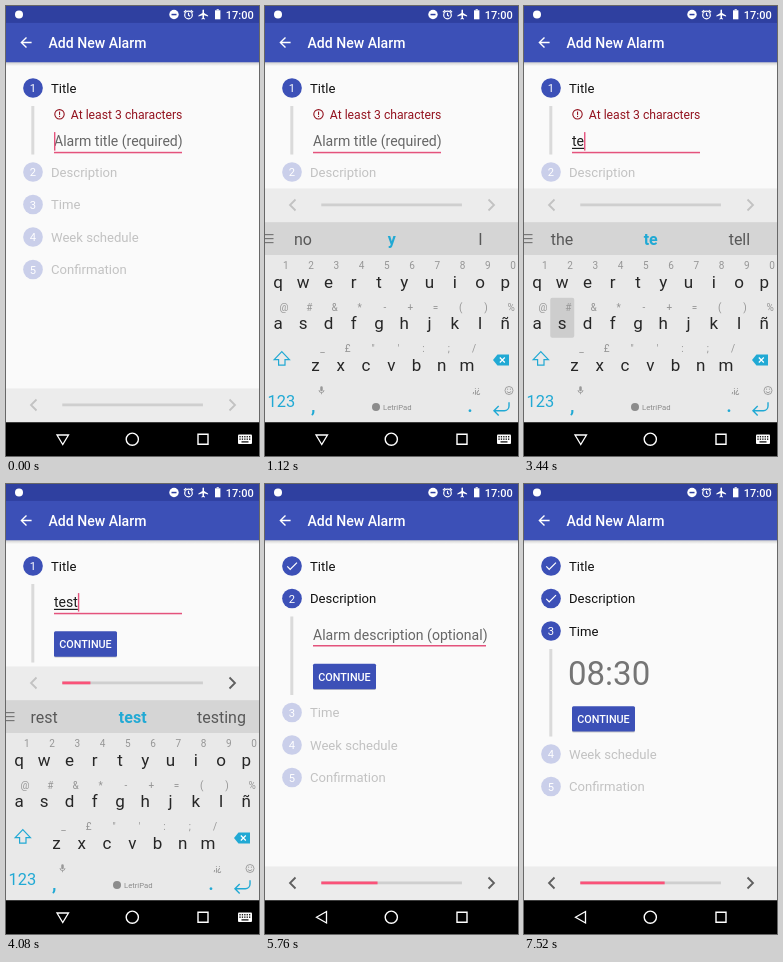
These frames come from a looping animation (253x450 px, 8000 ms). An HTML page with a canvas:

```html
<!DOCTYPE html>
<html lang="en">
<head>
<meta charset="utf-8">
<title>Add New Alarm</title>
<style>
html, body { margin: 0; width: 100%; height: 100%; overflow: hidden; background: #fafafa; }
canvas { display: block; width: 253px; height: 450px; }
</style>
</head>
<body>
<canvas id="stage"></canvas>
<script>
const W = 253, H = 450, LOOP = 8000, NAV = 416.25, BAR = 33.75;
const INDIGO = '#3c50b7', DARK = '#2f40a0', PINK = '#e4527c', CYAN = '#21a9d4', RED = '#941420';
const canvas = document.getElementById('stage');
const g = canvas.getContext('2d');
const dpr = window.devicePixelRatio || 1;
canvas.width = W * dpr;
canvas.height = H * dpr;

const ICONS = {
  back: 'M20 11H7.83l5.59-5.59L12 4l-8 8 8 8 1.41-1.41L7.83 13H20v-2z',
  plane: 'M21 16v-2l-8-5V3.5c0-.83-.67-1.5-1.5-1.5S10 2.67 10 3.5V9l-8 5v2l8-2.5V19l-2 1.5V22l3.5-1 3.5 1v-1.5L13 19v-5.5l8 2.5z',
  check: 'M9 16.17L4.83 12l-1.42 1.41L9 19 21 7l-1.41-1.41z',
  shift: 'M12 3L2.5 13H8v7h8v-7h5.5z',
  mic: 'M12 14a3 3 0 0 0 3-3V5a3 3 0 0 0-6 0v6a3 3 0 0 0 3 3zm5-3a5 5 0 0 1-10 0H5a7 7 0 0 0 6 6.9V21h2v-3.1A7 7 0 0 0 19 11z',
  enter: 'M20 4v4a5 5 0 0 1-5 5H4M9 8l-5 5 5 5',
};

// Animation helpers
const ramp = (t, a, b) => Math.min(1, Math.max(0, (t - a) / (b - a)));
const ease = (t, a, b) => (1 - Math.cos(Math.PI * ramp(t, a, b))) / 2;
const within = (t, a, b) => t >= a && t < b;

// Drawing helpers
function rect(x, y, w, h, color) {
  g.fillStyle = color;
  g.fillRect(x, y, w, h);
}
function round(x, y, w, h, r, color) {
  g.fillStyle = color;
  g.beginPath();
  g.roundRect(x, y, w, h, r);
  g.fill();
}
function disc(x, y, r, color) {
  g.fillStyle = color;
  g.beginPath();
  g.arc(x, y, r, 0, 7);
  g.fill();
}
function stroke(path, color, width = 1) {
  g.strokeStyle = color;
  g.lineWidth = width;
  g.stroke(new Path2D(path));
}
function ring(x, y, r, color, width = 1) {
  g.strokeStyle = color;
  g.lineWidth = width;
  g.beginPath();
  g.arc(x, y, r, 0, 7);
  g.stroke();
}
function text(s, x, y, size, color, align = 'left', weight = 400) {
  g.font = `${weight} ${size}px Roboto, sans-serif`;
  g.textAlign = align;
  g.fillStyle = color;
  g.fillText(s, x, y);
}
// 24-unit icon centred on x, y
function icon(name, x, y, scale, color, width = 0) {
  g.save();
  g.translate(x, y);
  g.scale(scale, scale);
  g.translate(-12, -12);
  if (width) stroke(ICONS[name], color, width / scale);
  else { g.fillStyle = color; g.fill(new Path2D(ICONS[name])); }
  g.restore();
}
function clip(x, y, w, h) {
  g.save();
  g.beginPath();
  g.rect(x, y, w, Math.max(0, h));
  g.clip();
}

function header() {
  const shade = g.createLinearGradient(0, 56, 0, 60);
  shade.addColorStop(0, 'rgba(0,0,0,.18)');
  shade.addColorStop(1, 'rgba(0,0,0,0)');
  rect(0, 56, W, 4, shade);
  rect(0, 0, W, 56.25, INDIGO);
  rect(0, 0, W, 16.9, DARK);
  disc(13, 8.5, 4, '#fff');
  disc(168, 8.5, 4.7, '#fff');
  rect(165.5, 7.8, 5, 1.5, DARK);
  ring(182.5, 9, 3.8, '#fff', 1.2);
  stroke('M182.5 6.8V9.2L184 10.2M177.9 6.2L180.2 4.2M187.1 6.2L184.8 4.2', '#fff', 1.2);
  icon('plane', 197.5, 8.5, .51, '#fff');
  rect(209, 4.3, 5.4, 9, '#fff');
  rect(210.6, 3.2, 2.2, 1.2, '#fff');
  text('17:00', 219.8, 12.8, 11, '#fff', 'left', 500);
  icon('back', 20, 36.5, .7, '#fff');
  text('Add New Alarm', 42.5, 41.9, 14.06, '#fff', 'left', 500);
}

function field(y, hint, value, width, cursor) {
  const base = y - 6.2;
  if (value) {
    text(value, 48, base, 14.06, '#1c1c1c');
    rect(48, base + 1.5, g.measureText(value).width, 1.2, '#1c1c1c');
  } else text(hint, 48, base, 14.06, '#666');
  rect(48, y - .7, width, 1.5, PINK);
  if (cursor) {
    g.font = '14.06px Roboto, sans-serif';
    rect(48 + g.measureText(value).width, y - 20.4, 1.4, 18.5, PINK);
  }
}

function button(y, pressed) {
  round(48, y + .8, 63, 25.4, 1.5, 'rgba(0,0,0,.2)');
  round(48, y, 63, 25.4, 1.5, pressed ? DARK : INDIGO);
  text('CONTINUE', 79.5, y + 16.7, 10.8, '#fff', 'center', 500);
}

function titleBody(y, t, typed) {
  const valid = ease(t, 3560, 4060), line = y + 64.5 - 17 * valid;
  if (valid < 1) {
    g.globalAlpha = 1 - valid;
    ring(53.5, y + 26.3, 4.7, RED, 1.1);
    rect(53, y + 23.6, 1.1, 3.3, RED);
    rect(53, y + 27.9, 1.1, 1.1, RED);
    text('At least 3 characters', 64.8, y + 30.8, 12.2, RED);
    g.globalAlpha = 1;
  }
  field(line, 'Alarm title (required)', typed, 128, t < 1120 || within(t, 2080, 4960));
  button(line + 17.8, within(t, 4880, 5300));
}
function descriptionBody(y, t) {
  field(y + 47.2, 'Alarm description (optional)', '', 173, within(t, 5200, 5760));
  button(y + 65.3, within(t, 7040, 7360));
}
function timeBody(y) {
  text('08:30', 44, y + 53.8, 33, '#757575');
  button(y + 75.2, false);
}

function steps(t, active, typed) {
  const first = (51.5 + 30 * ease(t, 3560, 4060)) * (1 - ease(t, 5040, 5440));
  const second = 81.5 * (ease(t, 4980, 5400) - ease(t, 7080, 7510));
  const third = 90.5 * ease(t, 7060, 7500);
  const list = [
    ['Title', first, titleBody],
    ['Description', second, descriptionBody],
    ['Time', third, timeBody],
    ['Week schedule', 0],
    ['Confirmation', 0],
  ];
  let y = 82;
  list.forEach(([name, open, body], i) => {
    const n = i + 1, off = n > active;
    disc(27, y, 9.85, off ? '#cacfea' : INDIGO);
    if (n < active) icon('check', 27, y, .6, '#fff');
    else text(n, 27, y + 4, 11.2, '#fff', 'center');
    text(name, 45, y + 4.7, 13.1, off ? '#c2c2c2' : '#111');
    if (open > 1) {
      clip(0, y + 17, W, open - 1);
      rect(25.3, y + 18, 3, open - 3, '#dadada');
      body(y, t, typed);
      g.restore();
    }
    y += 32.5 + open;
  });
}

function bottomBar(y, done) {
  rect(0, y, W, BAR, '#ececec');
  const c = y + 16.5, tone = on => on ? '#5f5f5f' : '#c2c2c2';
  stroke(`M30.5 ${c - 5.5}l-5.5 5.5 5.5 5.5`, tone(done > 1), 1.8);
  stroke(`M223.5 ${c - 5.5}l5.5 5.5 -5.5 5.5`, tone(done > 0), 1.8);
  rect(56.3, c - 1.5, 140.6, 2.8, '#cfcfcf');
  rect(56.3, c - 1.5, 140.6 * done / 5, 2.8, '#fa5279');
}

// Letters, marks, first x, baseline, mark offset
const ROWS = [
  ['qwertyuiop', '1234567890', 13, 281.6, 7.8],
  ['asdfghjklñ', '@#&*-+=()%', 13, 322.8, 6],
  ['zxcvbnm', '_£"\':;/', 50.5, 364.5, 7],
];
const PRESSES = [['t', 2080, 2400], ['e', 2960, 3120], ['s', 3440, 3560], ['t', 3640, 3800]];
const HINTS = [['no', 'y', 'I'], ['the', 't', 'to'], ['the', 'te', 'tell'], ['yes', 'tes', 'test'], ['rest', 'test', 'testing']];

function keyboard(dy, t, count) {
  clip(0, 216, W, 201);
  g.translate(0, dy);
  rect(0, 216.2, W, 201, '#e9e9e9');
  rect(0, 216.2, W, 32.8, '#d5d5d5');
  for (const y of [228, 232, 236]) rect(0, y, 8.5, 1.2, '#777');
  HINTS[count].forEach((s, i) =>
    text(s, 38 + 88.7 * i, 239.2, 16, i === 1 ? CYAN : '#585858', 'center', i === 1 ? 700 : 400));

  for (const [letters, marks, x0, base, shift] of ROWS) {
    [...letters].forEach((key, i) => {
      const x = x0 + 25.25 * i;
      const down = PRESSES.some(([k, a, b]) => k === key && within(t, a, b));
      if (down) round(x - 12, base - 31, 24, 40, 2, '#cdcdcd');
      text(key, x, base, 17, '#262626', 'center');
      text(marks[i], x + shift, base - 18.2, 10, '#969696', 'center');
    });
  }
  icon('shift', 16.8, 352.8, .8, CYAN, 1.2);
  g.fillStyle = CYAN;
  g.fill(new Path2D('M228 354l4.5-5.5H244v11H232.5z'));
  stroke('M234.8 351.5l5 5m0-5l-5 5', '#fff', 1.2);
  text('123', 16.4, 401.3, 16.4, CYAN, 'center');
  text(',', 48.3, 406, 20, CYAN, 'center', 500);
  text('.', 205, 406, 20, CYAN, 'center', 500);
  icon('mic', 56.5, 384.5, .42, '#999');
  text(',¡¿', 211.5, 387, 9, '#888', 'center');
  ring(244, 384.5, 4, '#999', .9);
  stroke('M241.8 385.5q2.2 2.6 4.4 0M242.6 382.6v1.2M245.4 382.6v1.2', '#999', .9);
  icon('enter', 236.5, 403.8, .94, CYAN, 1.4);
  disc(111, 401, 4, '#8c8c8c');
  text('LetriPad', 118, 404, 7.7, '#8c8c8c');
  g.restore();
}

function navBar(typing) {
  rect(0, NAV, W, H - NAV, '#000');
  stroke(typing ? 'M51 429h11.5l-5.75 9.5z' : 'M61.5 427.5v11.5l-10-5.75z', '#fff', 1.3);
  ring(126.3, 433.2, 6.1, '#fff', 1.4);
  stroke('M192 428.3h10v10h-10z', '#fff', 1.4);
  if (!typing) return;
  round(232, 428.5, 14, 9.5, 1, '#fff');
  for (let i = 0; i < 5; i++)
    for (let j = 0; j < 2; j++) rect(233.4 + i * 2.4, 430.1 + j * 2.4, 1.3, 1.3, '#000');
  rect(235.5, 435.3, 7, 1.2, '#000');
}

function draw(t) {
  g.setTransform(dpr, 0, 0, dpr, 0, 0);
  rect(0, 0, W, H, '#fafafa');
  const count = [2400, 3040, 3500, 3700].filter(at => t >= at).length;
  const active = t < 4960 ? 1 : t < 7100 ? 2 : 3;
  const done = active > 1 ? active : count > 2 ? 1 : 0;
  const rise = 1 - (1 - ramp(t, 400, 900)) ** 2;
  const shown = t < 4880 ? rise : 1 - ramp(t, 4880, 5030);
  const dy = 200 * (1 - shown);

  steps(t, active, 'test'.slice(0, count));
  header();
  bottomBar(NAV - BAR - 200 + dy, done);
  if (shown > 0) keyboard(dy, t, count);
  navBar(t < 4960);
}

function frame() {
  draw(performance.now() % LOOP);
  requestAnimationFrame(frame);
}
frame();
</script>
</body>
</html>
```
